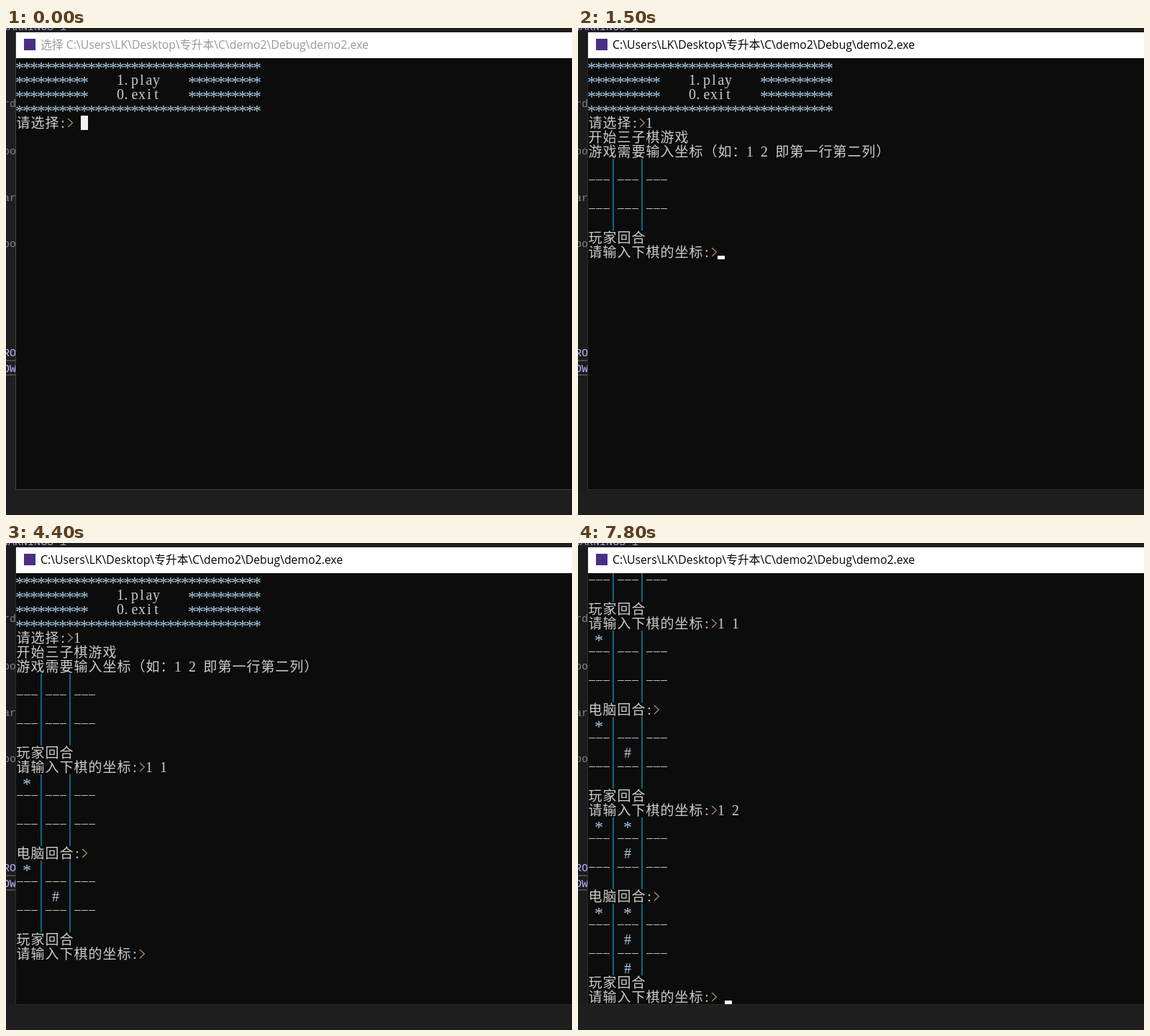
These frames come from a looping animation (787 px wide and 678 px high, 8 s). An HTML page with a canvas:

```html
<!DOCTYPE html>
<html lang="zh">
<head>
<meta charset="utf-8">
<title>Console game</title>
<style>
html, body { margin: 0; width: 787px; height: 678px; overflow: hidden; background: #1e1e1f; }
canvas { display: block; }
</style>
</head>
<body>
<canvas id="stage" width="787" height="678"></canvas>
<script>
const ctx = document.getElementById('stage').getContext('2d');
const LOOP = 8000, LEFT = 14, TOP = 42, CELL = 10, ROW = 20, ROWS = 30;
const CJK = '"Noto Sans CJK SC", "Noto Sans CJK", sans-serif';
const PATH = 'C:\\Users\\LK\\Desktop\\专升本\\C\\demo2\\Debug\\demo2.exe';

const rule = '---|---|---';
const board = (a = '', b = '', c = '') =>
  [a, rule, b, rule, c].map(s => s || '   |   |   ');
const stars = '*'.repeat(34), side = '*'.repeat(10);
const ask = ['玩家回合', '请输入下棋的坐标:>'];
const first = ' * |   |   ', second = ' * | * |   ', middle = '   | # |   ';

const log = [
  stars, `${side}    1.play    ${side}`, `${side}    0.exit    ${side}`, stars,
  '请选择:>',
  '开始三子棋游戏', '游戏需要输入坐标（如：1 2 即第一行第二列）',
  ...board(), ...ask,
  ...board(first), '电脑回合:>',
  ...board(first, middle), ...ask,
  ...board(second, middle), '电脑回合:>',
  ...board(second, middle, middle), ...ask
];
const answers = { 4: '1', 13: '1 1', 26: '1 2' };

// time, lines printed, typed text, cursor shown
const states = [
  [0, 5, '', 0], [1000, 5, '', 1], [1200, 5, '1', 1],
  [1500, 14, '', 1], [2500, 14, '1', 1], [3000, 14, '1', 0],
  [3100, 14, '1 ', 1], [3300, 14, '1 1', 1], [3400, 14, '1 1', 0],
  [3500, 27, '', 1], [4400, 27, '', 0], [4600, 27, '1', 1], [4900, 27, '1', 0],
  [5100, 27, '1 ', 1], [5300, 27, '1 2', 1], [5400, 27, '1 2', 0],
  [5900, 40, '', 1], [6800, 40, '', 0], [6900, 40, ' ', 1],
  [7300, 40, ' ', 0], [7800, 40, ' ', 1]
];

function rect(color, x, y, w, h) {
  ctx.fillStyle = color;
  ctx.fillRect(x, y, w, h);
}

function text(s, x, y, font, color, align = 'left') {
  ctx.font = font;
  ctx.fillStyle = color;
  ctx.textAlign = align;
  ctx.fillText(s, x, y);
}

function glyph(ch, x, y) {
  if (ch === '|') return rect('#0f6688', x + 4, y, 2, ROW);
  if (ch === '-') return rect('#bdbdbd', x + 1, y + 9, 9, 1);
  if (ch === '>') {
    ctx.strokeStyle = '#b98a62';
    ctx.lineWidth = 1.2;
    ctx.beginPath();
    ctx.moveTo(x + 2, y + 4);
    ctx.lineTo(x + 8.5, y + 10);
    ctx.lineTo(x + 2, y + 16);
    ctx.stroke();
    return;
  }
  const mid = x + CELL / 2;
  if (ch === '*') return text(ch, mid, y + 21.3, '24px "Liberation Serif", serif', '#a9cbe2', 'center');
  const shift = ch === '.' ? -2 : 0;
  text(ch, mid + shift, y + 17, '20px "Liberation Serif", serif', ch === '#' ? '#b4cfe0' : '#cccccc', 'center');
}

// Draws one console line and returns the x where it ends
function line(s, y) {
  let x = LEFT;
  for (const ch of s) {
    const wide = ch > '\u2fff';
    if (wide) text(ch, x + CELL, y + 17, `300 19px ${CJK}`, '#cccccc', 'center');
    else if (ch !== ' ') glyph(ch, x, y);
    x += wide ? 2 * CELL : CELL;
  }
  return x;
}

function editor(active) {
  rect('#1e1e1f', 0, 0, 787, 678);
  if (active) rect('#1b1b1c', 0, 6, 14, 637);
  const mono = '15px "Liberation Mono", monospace';
  text('WARNINGS 1', 84, 3, mono, '#a9a4dc', 'right');
  [['rd', 110], ['bo', 176], ['ar', 241], ['bo', 305]].forEach(([s, y]) =>
    text(s, 14, y, mono, '#858585', 'right'));
  rect('#4a4a4a', 0, 462, 14, 2);
  rect('#4a4a4a', 0, 482, 14, 2);
  text('RO', 14, 457, mono, '#beb7ff', 'right');
  text('OW', 14, 479, mono, '#beb7ff', 'right');
}

function draw(t) {
  const active = t >= 500, selecting = t < 1200;
  const [, count, typed, cursor] = states.filter(s => s[0] <= t).pop();

  editor(active);
  rect(active ? '#2b2b2b' : '#434343', 13, 6, 774, 637);
  rect('#0c0c0c', LEFT, TOP, 773, 600);
  rect('#ffffff', LEFT, 6, 773, 36);
  rect('#4b2e83', 25, 15, 16, 16);
  text((selecting ? '选择 ' : '') + PATH, 48, 29, `15.8px "Open Sans", ${CJK}`, active ? '#000000' : '#999999');

  const start = Math.max(0, count - ROWS);
  let x, y;
  for (let i = start; i < count; i++) {
    y = TOP + (i - start) * ROW;
    x = line(log[i] + (i < count - 1 ? answers[i] || '' : typed), y);
  }
  if (cursor) rect('#f2f2f2', x, y + 15, CELL, 5);
  if (selecting) rect('#f2f2f2', 104, 122, CELL, ROW);
}

function tick() {
  draw(performance.now() % LOOP);
  requestAnimationFrame(tick);
}
tick();
</script>
</body>
</html>
```
